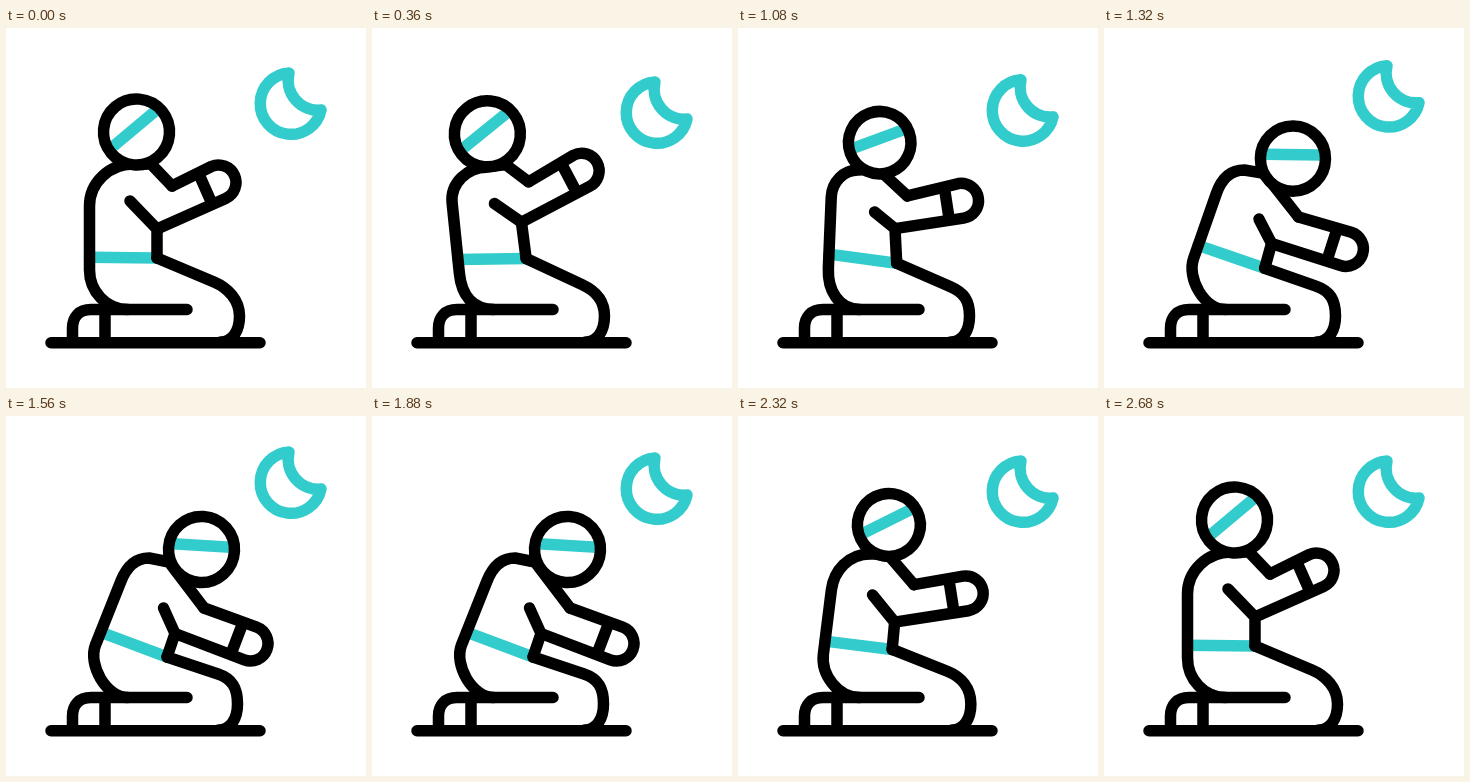
An HTML page with a canvas that plays this animation: 360 px wide and 360 px high, repeating every 3000 ms.

```html
<!DOCTYPE html>
<html lang="en">
<head>
<meta charset="utf-8">
<title>Kneeling figure and moon</title>
<style>
  html, body { margin: 0; width: 100%; height: 100%; overflow: hidden; background: #fff; }
  canvas { display: block; width: 360px; height: 360px; }
</style>
</head>
<body>
<canvas id="stage" width="360" height="360"></canvas>
<script>
const ctx = document.getElementById('stage').getContext('2d');
const LOOP = 3000, STEP = 40;
const BLACK = '#000', TEAL = '#33cccc';
const LINE = 11.5, HEAD_R = 33, HAND_R = 17.5;

const upright = {
  head: [130.5, 104], band: [-40], neck: [145, 136], top: [127, 136],
  back: [83.5, 178], hip: [83.5, 242], inner: [166, 158], hand: [212.5, 154.5],
  elbow: [151, 201], tip: [124, 173], belly: [151, 230], thigh: [208, 254], knee: [233.5]
};
const leaning = {
  head: [101.5, 107.5], band: [-38], neck: [123, 137], top: [103, 142],
  back: [77, 172], hip: [91, 249], inner: [148, 150], hand: [207, 132],
  elbow: [148, 188], tip: [121, 178], belly: [157, 231], thigh: [212, 259], knee: [231.5]
};
const bowed = {
  head: [195.5, 133.5], band: [3.5], neck: [163, 146], top: [143, 142],
  back: [115, 165], hip: [89.5, 229], inner: [198, 192], hand: [244.5, 227.5],
  elbow: [169, 217.5], tip: [157.5, 192], belly: [161, 241], thigh: [212, 258], knee: [231.5]
};

// start, end, from, to, rise of the head's arc, reach of the hand's arc
const moves = [
  [0, 700, upright, leaning, 0, 0],
  [800, 1420, leaning, bowed, 4, 0],
  [1900, 2570, bowed, upright, 5, 6]
];
const moonKeys = [[0, 0], [840, 21], [1400, -12], [2040, 0], [LOOP, 0]];

const moon = new Path2D('M283 45A30.7 30.7 0 1 0 315 82A30 30 0 0 1 283 45Z');
const base = new Path2D('M45 314.7H254M66.5 314V300C66.5 289 73 281.5 85 281.5H181M99 282V314');

const mix = (a, b, s) => a + (b - a) * s;
const clamp = x => Math.min(1, Math.max(0, x));
const smooth = x => x * x * (3 - 2 * x);

function extend(from, to, length) {
  const dx = to[0] - from[0], dy = to[1] - from[1], d = Math.hypot(dx, dy);
  return [to[0] + dx / d * length, to[1] + dy / d * length];
}

function poseAt(t) {
  const [start, end, from, to, rise, reach] = moves.filter(m => m[0] <= t).pop();
  const s = smooth(clamp((t - start) / (end - start)));
  const bulge = 4 * s * (1 - s);
  const pose = {};
  for (const key in from) pose[key] = from[key].map((v, i) => mix(v, to[key][i], s));
  pose.head[1] -= rise * bulge;
  pose.hand[0] += reach * bulge;
  pose.radius = HEAD_R - (rise ? 1.8 * bulge : 0);
  return pose;
}

function moonOffset(t) {
  const i = moonKeys.findIndex(k => k[0] > t);
  const [t0, y0] = moonKeys[i - 1], [t1, y1] = moonKeys[i];
  return mix(y0, y1, (t - t0) / (t1 - t0));
}

function line(color, ...points) {
  ctx.strokeStyle = color;
  ctx.beginPath();
  points.forEach(p => ctx.lineTo(...p));
  ctx.stroke();
}

function drawTorso({ neck, top, back, hip, inner, belly, thigh, knee }) {
  const beltStart = back.map((v, i) => mix(v, hip[i], 0.8));
  line(TEAL, beltStart, belly);

  ctx.strokeStyle = BLACK;
  ctx.beginPath();
  ctx.moveTo(...inner);
  ctx.lineTo(...neck);
  ctx.lineTo(...top);
  ctx.bezierCurveTo(top[0] - 0.55 * (top[0] - back[0]), top[1],
    ...extend(hip, back, 0.55 * (back[1] - top[1])), ...back);
  ctx.lineTo(...hip);
  ctx.bezierCurveTo(...extend(back, hip, 21), 100, 281.5, 122, 281.5);

  const [x] = knee;
  ctx.moveTo(...belly);
  ctx.lineTo(...thigh);
  ctx.bezierCurveTo(...extend(belly, thigh, 15), x, 272, x, 288);
  ctx.bezierCurveTo(x, 303, x - 7, 314, x - 19, 314);
  ctx.stroke();
}

function drawArm({ inner, hand, elbow, tip, belly }) {
  const dx = hand[0] - elbow[0], dy = hand[1] - elbow[1];
  const angle = Math.atan2(dy, dx) + Math.asin(HAND_R / Math.hypot(dx, dy));
  const c = Math.cos(angle), s = Math.sin(angle);
  const local = (along, across) => [hand[0] + along * c - across * s, hand[1] + along * s + across * c];

  ctx.strokeStyle = BLACK;
  ctx.beginPath();
  ctx.moveTo(...inner);
  ctx.arc(...hand, HAND_R, angle - Math.PI / 2, angle + Math.PI / 2);
  ctx.lineTo(...elbow);
  ctx.stroke();
  line(BLACK, local(-14.5, -HAND_R + 2), local(-14.5, HAND_R - 2));
  line(BLACK, tip, elbow, belly);
}

function drawHead({ head, band, radius }) {
  ctx.save();
  ctx.translate(...head);
  ctx.beginPath();
  ctx.arc(0, 0, radius, 0, 2 * Math.PI);
  ctx.fillStyle = '#fff';
  ctx.fill();
  ctx.rotate(band[0] * Math.PI / 180);
  line(TEAL, [4 - radius, -4], [radius - 4, -4]);
  ctx.strokeStyle = BLACK;
  ctx.beginPath();
  ctx.arc(0, 0, radius, 0, 2 * Math.PI);
  ctx.stroke();
  ctx.restore();
}

function draw(t) {
  const pose = poseAt(t);
  ctx.fillStyle = '#fff';
  ctx.fillRect(0, 0, 360, 360);
  ctx.lineWidth = LINE;
  ctx.lineCap = ctx.lineJoin = 'round';

  ctx.save();
  ctx.translate(0, moonOffset(t));
  ctx.strokeStyle = TEAL;
  ctx.stroke(moon);
  ctx.restore();

  drawTorso(pose);
  drawArm(pose);
  ctx.strokeStyle = BLACK;
  ctx.stroke(base);
  drawHead(pose);
}

const begin = performance.now();
function tick() {
  const t = (performance.now() - begin) % LOOP;
  draw(Math.floor(t / STEP) * STEP);
  requestAnimationFrame(tick);
}
tick();
</script>
</body>
</html>
```
